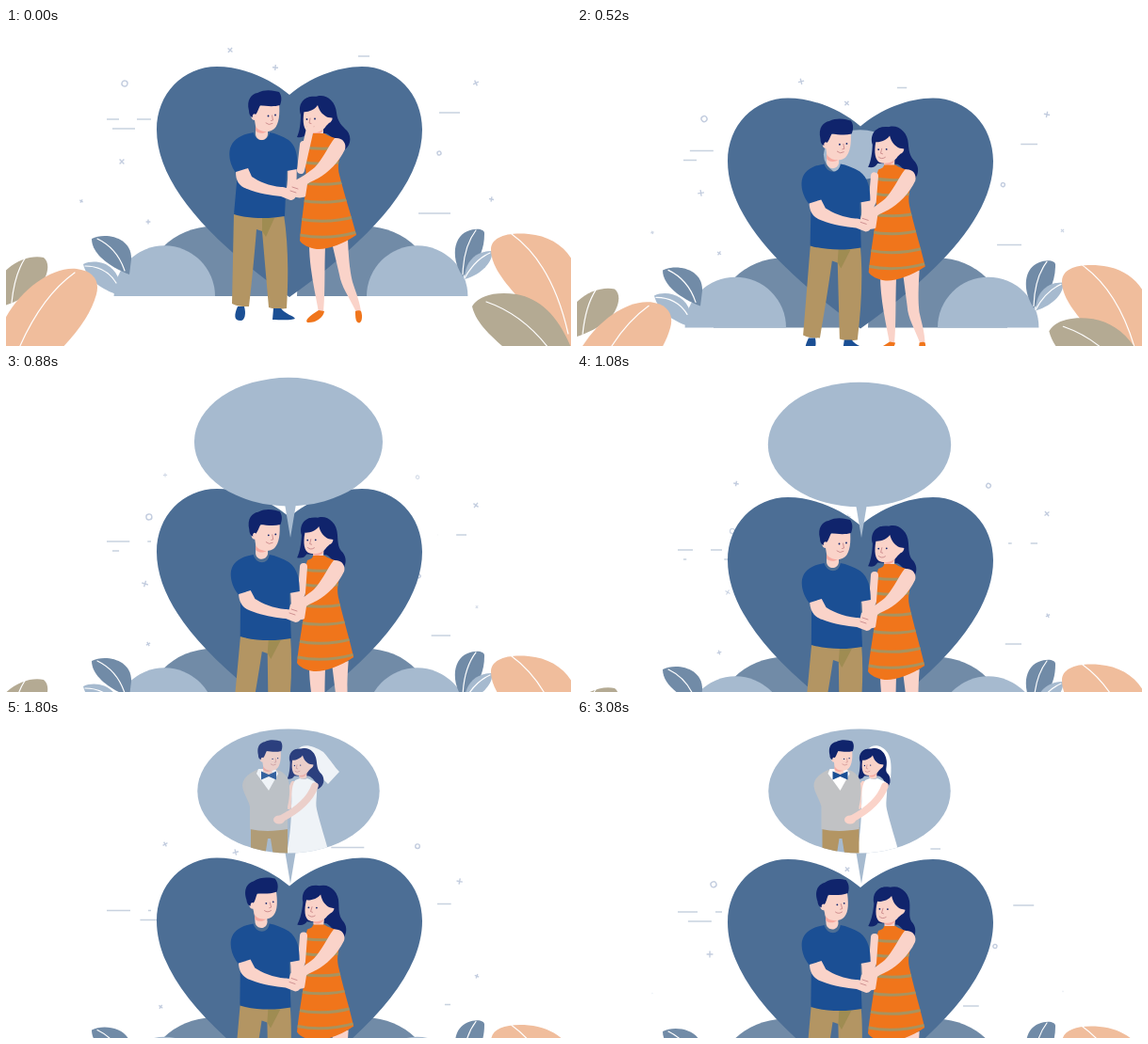
Animation of 600 by 338 pixels, one loop 7.08 s. Source, as an HTML page:

```html
<!DOCTYPE html>
<html lang="en">
<head>
<meta charset="utf-8">
<title>Couple dreaming of a wedding</title>
<style>
  html, body { margin: 0; width: 100%; height: 100%; overflow: hidden; background: #fff; }
  svg { display: block; width: 100%; height: 100%; }
  .heart { fill: #4c6e95; }
  .slate { fill: #718ba7; }
  .mist { fill: #a6bacf; }
  .peach { fill: #f0bd9c; }
  .sand { fill: #b4aa93; }
  .skin { fill: #fad3c9; }
  .blush { fill: #f7aaa0; }
  .hair { fill: #10246c; }
  .navy { fill: #1b4f94; }
  .tan { fill: #b39563; }
  .orange { fill: #f0751b; }
  .grey { fill: #c1c2c4; }
  .white { fill: #fff; }
  .vein { fill: none; stroke: #fff; stroke-width: 1.2; stroke-linecap: round; }
  .stripe { fill: none; stroke: #a8935f; stroke-width: 3; }
  .limb { fill: none; stroke: #fad3c9; stroke-linecap: round; stroke-linejoin: round; }
  .ink { fill: none; stroke: #c58183; stroke-width: .8; stroke-linecap: round; }
  .dash { fill: none; stroke: #c8d2df; stroke-width: 1.5; }
  .spark { fill: none; stroke: #c3cddf; stroke-width: 1.4; }
</style>
</head>
<body>
<svg id="stage" viewBox="0 0 600 338" preserveAspectRatio="none"></svg>
<script>
const LOOP = 7080, LAST = 3080, STEP = 40;
const POSE = [0, 320, 680, 1080, 1800, 2440, 3080];
const $ = id => document.getElementById(id);
const clamp = v => Math.max(0, Math.min(1, v));
const ramp = (t, a, b) => clamp((t - a) / (b - a));
const fill = (cls, d) => `<path class="${cls}" d="${d}"/>`;
const dot = (x, y, r = .9) => `<circle class="hair" cx="${x}" cy="${y}" r="${r}"/>`;

// Smooth monotone curve through a few timed values
function track(ts, vs) {
  const n = ts.length;
  const slope = i => (vs[i + 1] - vs[i]) / (ts[i + 1] - ts[i]);
  const tangent = i => {
    if (i === 0 || i === n - 1) return 0;
    const a = slope(i - 1), b = slope(i);
    return a * b <= 0 ? 0 : 2 * a * b / (a + b);
  };
  return t => {
    if (t <= ts[0]) return vs[0];
    if (t >= ts[n - 1]) return vs[n - 1];
    let i = 0;
    while (t > ts[i + 1]) i++;
    const h = ts[i + 1] - ts[i], u = (t - ts[i]) / h, w = 1 - u;
    return vs[i] * (1 + 2 * u) * w * w + vs[i + 1] * u * u * (3 - 2 * u)
      + h * (tangent(i) * u * w * w - tangent(i + 1) * u * u * w);
  };
}
const pose = (...vs) => track(POSE, vs);

const scroll = track([0, 180, 320, 440, 560, 680, 800, 1080, 1440, 1800, 2440, 3080],
                     [0, .8, 4.3, 17, 42, 63, 76, 90, 100, 105.5, 106.6, 107]);
const pop = track([400, 520, 680, 800, 920, 1080, 1240], [0, .4, .945, 1.04, 1.03, 1.005, 1]);
const sway = pose(0, 4, 6.5, 7, 6.5, 6.5, 6.5);
const manTilt = pose(0, 1, 1, 0, -5, -5, -5);
const manLift = pose(0, -2.5, -3.5, -3, -3.5, -3.5, -3.5);
const womanTilt = pose(0, 1, 2, 2, 5, 5, 5);
const womanLift = pose(0, -.5, -1, -1, -2, -2, -2);
const lock = pose(0, -2, -4, -5, -4, -6, -6);
const lean = pose(0, 1, 3, 3, 3, 3, 3);
const step = pose(0, -6, -8, -8, -8, -8, -8);
const raised = track([0, 330, 600], [1, 1, 0]);
const leafDrift = pose(0, .45, 1, 1.2, 1.2, 1.2, 1.2);
const groomX = track([1440, 1800, 2440, 3080], [0, 0, 2.6, .5]);
const brideX = track([1440, 1800, 2440, 3080], [1, 1, -2, 0]);
const veilOut = track([1440, 1800, 2300, 2440], [1, 1, .1, 0]);

// y, window left, window right, dash length, period, leading position
const slide = pose(139, 127, 114, 98, 63, 9, -29);
const dashes = [
  [97, 107, 154, 25, 44, slide],
  [107, 113, 165, 25, 65, t => 112 - .0192 * t],
  [30, 340, 386, 35, 71, t => 374 + .0235 * t],
  [90, 458, 489, 22, 42, t => 460 + .023 * t - 2.7e-6 * t * t],
  [197, 410, 472, 36, 95, t => 438 + .0155 * t]
];

// shape, size, x, y, drift x, drift y, appear, depart, vanish
const ring = 'ring', star = 'star';
const early = [
  [ring, 3, 126, 59, 39, 18], [star, 3.4, 123, 142, 37, 0],
  [ring, 2, 460, 133, -33, 1], [star, 3, 286, 42, 2, 20]
];
const sparks = [
  ...early.map(s => [...s, -999, 0, 1300]),
  ...early.map(s => [...s, 2450, 2326, 9999]),
  [star, 3.2, 238, 23.5, 13, 26, -999, 1080, 2350],
  [star, 3.2, 499, 58.5, -39, 17, -999, 1080, 2350],
  [star, 2.4, 151, 206, 30, -15, -999, 1080, 2350],
  [star, 2.8, 169, 26.5, 0, 0, 640, 1900, 2150],
  [ring, 2.3, 437, 28.7, 0, 0, 640, 1900, 2150],
  [star, 2.4, 500, 166.7, 0, 0, 640, 1900, 2150],
  [star, 2.6, 515.5, 182, 0, 0, -999, 0, 740],
  [star, 2, 80, 184, 0, 0, -999, 0, 740],
  [star, 2.6, 516, 181.5, 0, 0, 2150, 2300, 3180],
  [star, 2, 80, 183.5, 0, 0, 2250, 2300, 3180]
];

function manHead() {
  return fill('skin', 'M265 101L278 106V113C277 121 266 121 265 113Z')
    + fill('blush', 'M265 102L277 110C273 113 267 112 265 109Z')
    + fill('skin', 'M263 84L290 79C291 92 290 102 285 107C280 112 268 111 265 104L264 98C260 98 259 92 263 91Z')
    + fill('hair', 'M258 88C255 76 261 70 267 69C276 64 286 67 290 68C293 72 293 77 291 82C284 84 276 83 270 82C268 86 267 90 265 92C264 90 261 92 262 95C259 94 258 91 258 88Z')
    + dot(278.5, 93.5) + dot(286, 92.5)
    + fill('ink', 'M282.5 93L283.5 98L281.5 98.5M276 101Q279 104 283 101.5');
}
function womanHead(id) {
  return `<path id="${id}" class="hair"/>`
    + fill('skin', 'M326 103H337V114C334 117 328 117 326 114Z')
    + fill('blush', 'M326 110L337 107C336 112 330 115 326 112Z')
    + fill('skin', 'M317 86C315 96 315 106 320 110C326 113 336 111 340 104L343 101C348 99 348 91 342 92L341 82L325 78Z')
    + fill('hair', 'M315 89C320 90 328 87 331 82C333 89 337 93 342 95L350 96C352 80 342 72 330 73C318 71 311 80 315 89Z')
    + dot(319.5, 97) + dot(328, 96.5)
    + fill('ink', 'M323 96L322 101L324 101.5M320 105Q323 108 327 105');
}
const hairBack = x => `M313 92C309 80 318 71 327 74C337 68 350 76 351 90C352 100 ${357 + x} 104 ${362 + x} 109`
  + `C${368 + x} 116 ${366 + x} 128 ${356 + x} 131C352 122 345 114 340 112L319 112C317 116 313 117 309 116C312 110 313 100 313 92Z`;

function build() {
  const dress = 'M320 117C324 116 326 114 326 112H338C342 115 348 116 352 118L356 130C353 140 352 148 354 156C360 180 367 200 372 220C358 230 340 236 330 235C322 234 314 230 312 226C314 200 318 180 319 160C318 145 316 130 320 117Z';
  const stripes = [126, 142, 164, 183, 203, 220].map(y => fill('stripe', `M308 ${y - 1}Q340 ${y + 7} 376 ${y - 4}`)).join('');
  const hills = (cls, r, ...xs) => xs.map(x => fill(cls, `M${x - r} 285A${r} ${r} 0 0 1 ${x + r} 285Z`)).join('');
  $('stage').innerHTML = `
  <defs>
    <clipPath id="inDress"><path d="${dress}"/></clipPath>
    <clipPath id="inBubble"><ellipse cx="300" cy="75.5" rx="96.7" ry="66"/></clipPath>
  </defs>
  <g class="world">
    <path id="dashes" class="dash"/>
    <g id="sparks">${sparks.map(([kind, r]) => kind === ring
      ? `<circle class="spark" r="${r}"/>`
      : fill('spark', `M${-r} 0H${r}M0 ${-r}V${r}`)).join('')}</g>
    ${hills('slate', 74, 219, 383)}
    ${fill('heart', 'M301 71C280 53 250 41 224 41C188 41 160 70 160 108C160 165 215 225 301 286C387 225 442 165 442 108C442 70 414 41 378 41C352 41 322 53 301 71Z')}
    ${hills('mist', 53.7, 168.3, 436.7)}
  </g>
  <g id="bubble" class="mist">
    <ellipse cx="300" cy="75.5" rx="96.7" ry="66"/>
    <path d="M296 138H308L302 174Z"/>
  </g>
  <g id="dream" clip-path="url(#inBubble)">
    <g id="bride">
      <path id="veil" class="white"/>
      <g transform="translate(69 -23.3) scale(.74)">${womanHead('brideHair')}</g>
      ${fill('limb" stroke-width="6', 'M304 68Q298 80 299 92')}
      ${fill('white', 'M306 64L311 62Q315 64 319 62L328 66C331 76 327 86 329 95C333 112 338 126 342 142H297C301 122 302 105 302 92C303 82 301 72 306 64Z')}
    </g>
    <g id="groom">
      ${fill('tan', 'M260 114H299V145H284L281 126H278L275 145H260Z')}
      ${fill('grey', 'M269 52C258 56 251 62 251 70C252 78 257 84 259 92V116C272 119 288 118 299 116V92C302 80 302 66 298 60C294 55 290 53 284 52Z')}
      ${fill('white', 'M268 52L286 52L289 57L279 75L266 57Z')}
      <g transform="translate(77 -27.8) scale(.74)">${manHead()}</g>
      ${fill('navy', 'M279 58L271 54.5V63.5L279 60L287 63.5V54.5Z')}
    </g>
    <path id="brideArm" class="limb" stroke-width="7.5"/>
    <ellipse class="skin" cx="290" cy="106" rx="6" ry="4.5"/>
  </g>
  <g class="world">
    <g id="womanLegs">
      ${fill('skin', 'M322 229L339 232C338 260 339 280 337 302H332C328 280 322 255 322 229Z')}
      ${fill('orange', 'M332 300L338 301C337 308 328 314 320 313C317 311 322 306 332 300Z')}
      <g id="stepLeg">
        ${fill('skin', 'M346 228L363 224C364 250 366 262 368 270C372 282 376 292 377 302H372C364 285 356 275 354 262Z')}
        ${fill('orange', 'M371 301C373 300 376 300 377 301C379 306 378 313 375 313.5C371 313 371 307 371 301Z')}
      </g>
    </g>
    <g id="womanHead">${womanHead('womanHair')}</g>
    <g id="dress">
      ${fill('orange', dress)}
      <g clip-path="url(#inDress)">${stripes}</g>
    </g>
    <path id="nearArm" class="limb" stroke-width="8"/>
    <g id="pants">
      ${fill('tan', 'M242 196L295 198C300 230 300 265 298 298C291 299 285 299 279 297L272 216L266 214C264 240 261 270 258 296C251 296 245 296 240 293Z')}
      <path d="M272 202L285 202L276 222L272 216Z" fill="#9f8c52"/>
      ${fill('navy', 'M246 296H253C255 303 254 311 249 311C242 311 242 305 246 296Z')}
      ${fill('navy', 'M284 298H292C296 304 306 306 307 309C303 311 290 310 283 310Z')}
    </g>
    <g id="torso">
      ${fill('limb" stroke-width="9.5', 'M303.5 146Q305 160 302 175')}
      ${fill('navy', 'M263 111C250 113 241 118 238 128C236 136 238 146 244 154L246 153L242 198C258 203 280 203 296 200L298 152L309 150C310 138 309 126 300 119C294 115 286 112 280 111C278 122 265 122 263 111Z')}
      ${fill('skin', 'M244 153C244 162 247 168 256 171C268 176 282 178 292 179L302 183C306 183 309 179 308 176C300 170 296 169 292 169C280 168 268 163 261 158L257 149Z')}
    </g>
    <g id="farArm">
      ${fill('skin', 'M349 117C357 116 362 122 360 129C354 142 342 154 331 160C325 163 322 164 320 166L318 179C312 182 305 180 300 176L303 164C312 160 322 153 328 148C336 140 342 126 349 117Z')}
      ${fill('ink', 'M302 173L308 175M304 169L310 171')}
    </g>
    <g id="manHead">${manHead()}</g>
    ${fill('slate', 'M131 262C110 254 91 240 91 224C105 217 134 222 133 246Z')}
    ${fill('vein', 'M97 224Q118 234 126 258')}
    ${fill('mist', 'M82 251C95 245 115 250 120 268L117 283C103 278 86 268 82 251Z')}
    ${fill('vein', 'M84 253Q106 253 117 271')}
    ${fill('slate', 'M485 264C472 245 475 222 490 216C500 212 509 214 508 219C508 238 500 252 485 264Z')}
    ${fill('vein', 'M499 215Q486 232 485 262')}
    ${fill('mist', 'M487 267C487 250 497 237 516 237C518 248 505 262 487 267Z')}
    ${fill('vein', 'M514 239Q498 246 487 266')}
    ${fill('sand', 'M-4 262C8 247 27 241 40 244C48 250 44 266 34 276C22 286 8 292 -4 296Z')}
    ${fill('vein', 'M20 245Q9 262 6 292')}
    <g id="leftPeach">
      ${fill('peach', 'M-12 350C-12 300 40 252 75 256C92 258 100 268 96 283C90 305 75 325 50 350Z')}
      ${fill('vein', 'M73 260Q38 285 14 340')}
    </g>
    ${fill('peach', 'M515 236C515 223 530 217 555 219C580 221 600 236 606 258V345H596C580 315 555 300 540 282C528 268 515 252 515 236Z')}
    ${fill('vein', 'M537 219Q580 250 597 325')}
    <g id="rightSand">
      ${fill('sand', 'M495 296C502 284 520 280 542 283C570 288 590 310 604 350H540C525 335 500 318 495 296Z')}
      ${fill('vein', 'M510 291Q548 304 576 340')}
    </g>
  </g>`;
}

const move = (id, value) => $(id).setAttribute('transform', value);
const shape = (id, d) => $(id).setAttribute('d', d);
const skew = (k, y) => `matrix(1 0 ${k} 1 ${-k * y} 0)`;

function drawDashes(t) {
  let d = '';
  for (const [y, left, right, len, period, at] of dashes) {
    let x = at(t);
    x -= Math.ceil((x + len - left) / period) * period;
    for (; x < right; x += period) {
      const a = Math.max(x, left), b = Math.min(x + len, right);
      if (b > a) d += `M${a} ${y}H${b}`;
    }
  }
  shape('dashes', d);
}

function drawSparks(t) {
  sparks.forEach(([, , x, y, dx, dy, appear, depart, vanish], i) => {
    const u = Math.max(0, t - depart) / 1080;
    const size = ramp(t, appear, appear + 320) * (1 - ramp(t, vanish - 260, vanish));
    const el = $('sparks').children[i];
    el.setAttribute('transform', `translate(${x + dx * u * u} ${y + dy * u * u}) rotate(${20 + i * 25 + t * .07}) scale(${size})`);
    el.setAttribute('opacity', size);
  });
}

function render(t) {
  document.querySelectorAll('.world').forEach(g => g.setAttribute('transform', `translate(0 ${scroll(t)})`));
  drawDashes(t);
  drawSparks(t);

  move('bubble', `translate(301 174) scale(${pop(t)}) translate(-301 -174)`);
  $('dream').setAttribute('opacity', ramp(t, 1440, 1880));
  const bx = brideX(t), v = veilOut(t);
  move('groom', `translate(${groomX(t)} 0)`);
  move('bride', `translate(${bx} 0)`);
  shape('veil', `M309 31C314 25 324 26 ${330 + 6 * v} ${35 - v}C${334 + 10 * v} ${42 + v} ${334 + 14 * v} 50 ${333 + 20 * v} ${64 - 9 * v}L${331 + 10 * v} 68L322 50Z`);
  shape('brideHair', hairBack(-9 + 5 * v));
  shape('brideArm', `M${327 + bx} 70Q${320 + bx} 90 292 105`);

  const w = sway(t), d = lean(t);
  move('pants', skew(-w / 95, 295));
  move('torso', skew(w / 85, 115));
  move('manHead', `translate(0 ${manLift(t)}) rotate(${manTilt(t)} 271 118)`);
  move('womanHead', `translate(0 ${womanLift(t)}) rotate(${womanTilt(t)} 333 118)`);
  shape('womanHair', hairBack(lock(t)));
  move('dress', skew(-d / 110, 116));
  move('farArm', `translate(${-d / 3} 0)`);
  move('stepLeg', skew(step(t) / 72, 230));

  const r = raised(t);
  shape('nearArm', `M316 124L${314 - r} 151L${307 + 16 * r} ${172 - 65 * r}`);
  const k = leafDrift(t);
  move('leftPeach', `translate(${4 * k} ${2.5 * k})`);
  move('rightSand', `translate(${8 * k} ${-9 * k})`);
}

build();
const start = performance.now();
function tick() {
  const t = (performance.now() - start) % LOOP;
  render(Math.min(LAST, Math.floor(t / STEP) * STEP));
  requestAnimationFrame(tick);
}
tick();
</script>
</body>
</html>
```
